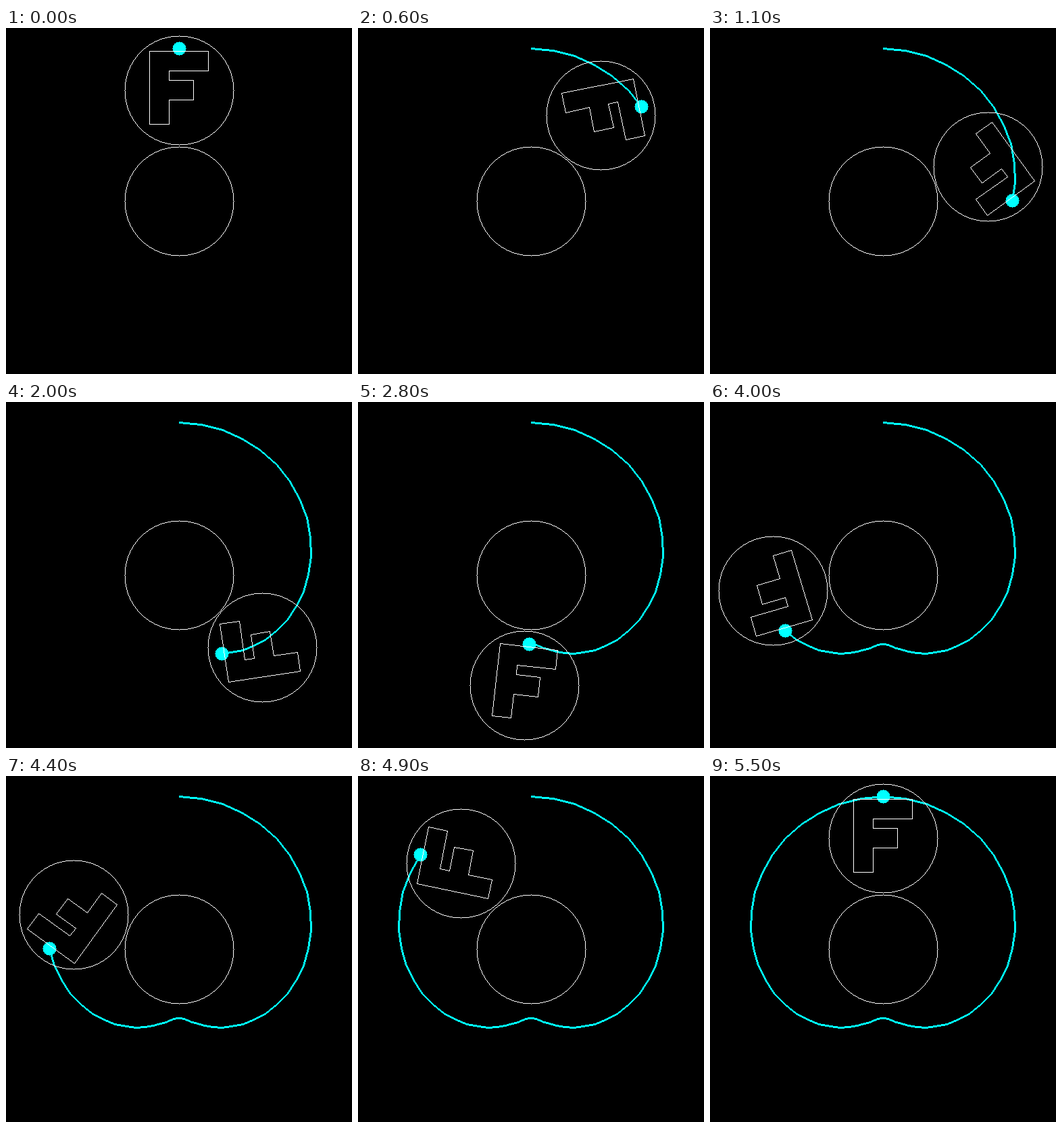
An HTML page that plays this animation: 512 px wide and 512 px high, repeating every 5600 ms.

```html
<!DOCTYPE html>
<html lang="en">
<head>
<meta charset="utf-8">
<title>Rolling circle</title>
<style>
  html, body { margin: 0; width: 100%; height: 100%; overflow: hidden; background: #000; }
  svg { display: block; width: 100vw; height: 100vh; }
  path { fill: #fff; }
  #trail, #dot { fill: #0ff; }
</style>
</head>
<body>
<svg viewBox="0 0 512 512" shape-rendering="crispEdges">
  <rect width="512" height="512" fill="#000"/>
  <path id="trail"/>
  <circle id="dot" r="10.02"/>
  <path id="hub"/>
  <path id="wheel"/>
  <path id="letter"/>
</svg>
<script>
const STEP = 100, TURN = 55, MID = 256;
const RADIUS = 81, ORBIT = 163.84, ARM = 61.44, UNIT = 14.336;
const LETTER = [
  [-3, -4], [3, -4], [3, -2], [-1, -2], [-1, -1],
  [1.5, -1], [1.5, 1], [-1, 1], [-1, 3.5], [-3, 3.5]
];

const [trail, dot, hub, wheel, letter] =
  ['trail', 'dot', 'hub', 'wheel', 'letter'].map(id => document.getElementById(id));

// Snap to the centre of the pixel that holds the point.
const snap = v => Math.floor(v + 1e-6) + 0.5;

// Place a point of the wheel, which turns twice per orbit.
function place(i, x, y) {
  const a = i / TURN * 2 * Math.PI;
  const c = Math.cos(2 * a), s = Math.sin(2 * a);
  return [
    snap(MID + ORBIT * Math.sin(a) + x * c - y * s),
    snap(MID - ORBIT * Math.cos(a) + x * s + y * c)
  ];
}

// A pixel line: its width is measured along the minor axis.
function line([x, y], [x2, y2], width) {
  const dx = x2 - x, dy = y2 - y;
  const n = Math.max(Math.abs(dx), Math.abs(dy));
  const ux = dx / n, uy = dy / n;
  const flat = Math.abs(ux) === 1;
  const ox = flat ? 0 : -uy * width, oy = flat ? ux * width : 0;
  return `M${x - (ux + ox) / 2} ${y - (uy + oy) / 2}` +
    `l${dx + ux} ${dy + uy}l${ox} ${oy}l${-dx - ux} ${-dy - uy}z`;
}

// A pixel circle around the origin, one pixel wide.
function ring(r) {
  const pixel = (x, y) => `M${x - 0.5} ${y - 0.5}h1v1h-1z`;
  const reach = Math.floor(r * Math.SQRT1_2);
  let d = '';
  for (let a = -reach; a <= reach; a++) {
    const b = Math.floor(Math.sqrt(r * r - a * a));
    d += pixel(a, b) + pixel(a, -b) + pixel(b, a) + pixel(-b, a);
  }
  return d;
}

const moveTo = (el, [x, y]) => el.setAttribute('transform', `translate(${x} ${y})`);

const path = Array.from({ length: TURN + 1 }, (_, i) => place(i, 0, -ARM));
const strokes = path.slice(1).map((p, i) => line(path[i], p, 3));

hub.setAttribute('d', ring(RADIUS));
wheel.setAttribute('d', ring(RADIUS));
moveTo(hub, [snap(MID), snap(MID)]);

function draw(i) {
  const corners = LETTER.map(([x, y]) => place(i, x * UNIT, y * UNIT));
  trail.setAttribute('d', strokes.slice(0, i).join(''));
  moveTo(dot, path[i]);
  moveTo(wheel, place(i, 0, 0));
  letter.setAttribute('d',
    corners.map((p, k) => line(p, corners[(k + 1) % corners.length], 1)).join(''));
}

const start = performance.now();
function tick() {
  const t = performance.now() - start;
  draw(Math.floor(t / STEP) % (TURN + 1));
  requestAnimationFrame(tick);
}
draw(0);
requestAnimationFrame(tick);
</script>
</body>
</html>
```
